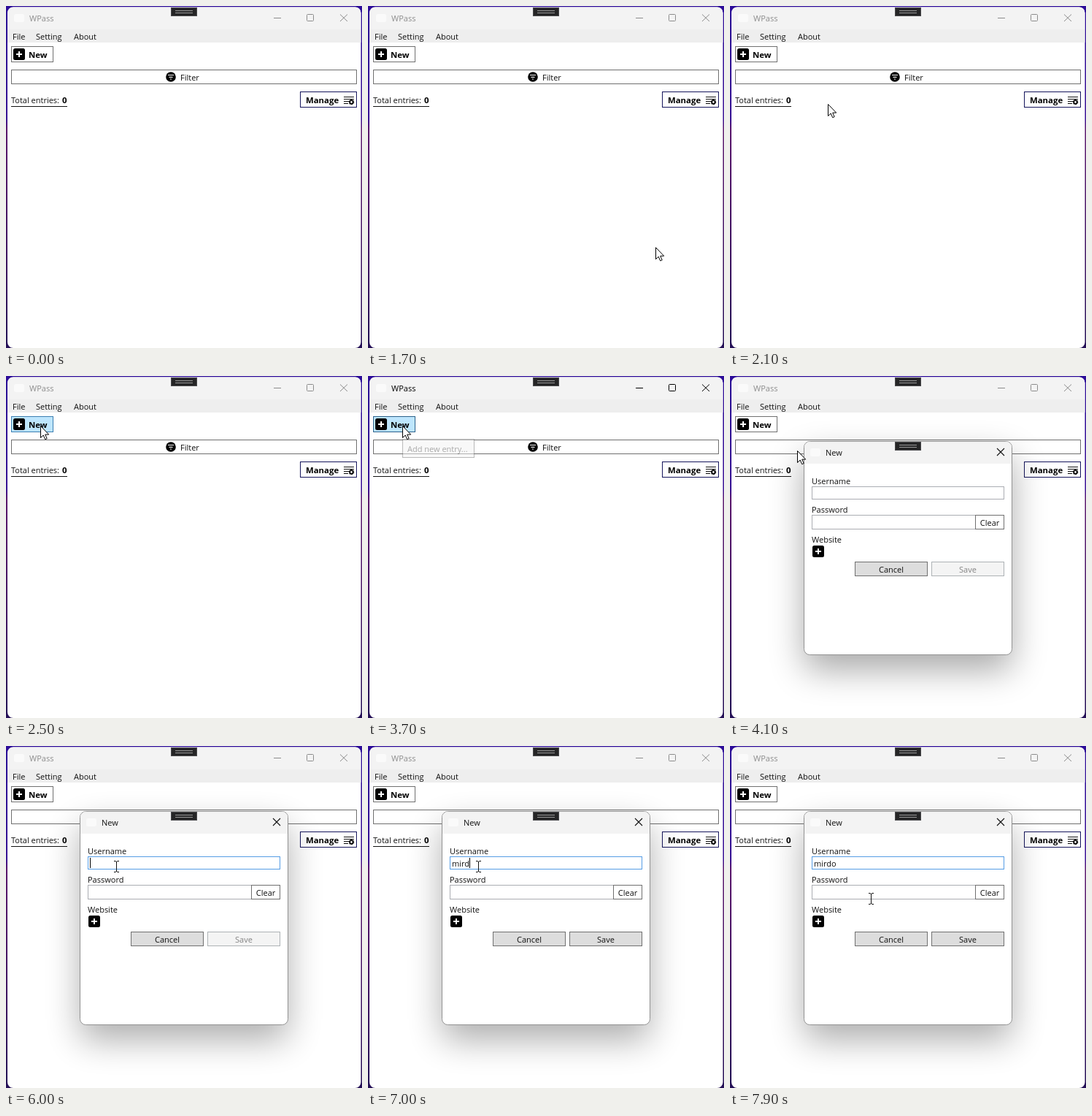
Recreate the animation shown at these times as an HTML page. Size 488x468 px, loop 8 s.

```html
<!DOCTYPE html>
<html lang="en">
<head>
<meta charset="utf-8">
<title>Password manager</title>
<style>
  html, body { margin: 0; width: 100%; height: 100%; overflow: hidden; }
  svg { display: block; width: 488px; height: 468px; }
  text { font: 11px "Open Sans", "Noto Sans", sans-serif; fill: #111; white-space: pre; }
  .bold { font-weight: 700; font-size: 11.4px; fill: #000; }
  .mid { text-anchor: middle; }
  .box { fill: #fff; stroke: #707070; }
  .field { fill: #fff; stroke: #abadb3; }
  .btn { fill: #ddd; stroke: #707070; }
  .line { fill: none; stroke: #111; }
  #chrome { --ink: #8c8c8c; }
  #chrome.active { --ink: #000; }
  #chrome text { fill: var(--ink); }
  #chrome path { fill: none; stroke: var(--ink); }
  #new.hover { fill: #bee6fd; stroke: #3c7fb1; }
  #new.pressed { stroke: #2c628b; }
  #user.hover { stroke: #7eb4ea; }
  #user.focus { stroke: #569de5; }
  #save.off rect { fill: #f4f4f4; stroke: #adb2b5; }
  #save.off text { fill: #838383; }
</style>
</head>
<body>
<svg viewBox="0 0 488 468">
  <defs>
    <linearGradient id="desk" x2="0" y2="1">
      <stop offset="0" stop-color="#2c0c98"/>
      <stop offset=".33" stop-color="#3a1296"/>
      <stop offset=".36" stop-color="#5c1a6e"/>
      <stop offset=".8" stop-color="#3a1460"/>
      <stop offset="1" stop-color="#241056"/>
    </linearGradient>
    <filter id="blur" x="-50%" y="-50%" width="200%" height="200%">
      <feGaussianBlur stdDeviation="24"/>
    </filter>
    <clipPath id="win"><rect x="2" y="1.500" width="484.500" height="466.500" rx="8"/></clipPath>
    <clipPath id="dlgClip"><rect x="102" y="90" width="284" height="291" rx="7.500"/></clipPath>
    <g id="pill">
      <rect x=".5" y=".5" width="35" height="11" fill="#252526" stroke="#4a4a4c"/>
      <path d="M6 4.500H30M6 7.500H30" stroke="#9a9a9a"/>
    </g>
    <g id="plus">
      <rect width="16" height="16" rx="2.500"/>
      <path d="M8 4V12M4 8H12" stroke="#fff" stroke-width="2"/>
    </g>
  </defs>

  <rect width="488" height="468" fill="url(#desk)"/>
  <g clip-path="url(#win)">
    <rect width="488" height="468" fill="#fff"/>
    <rect width="488" height="32" fill="#f3f3f3"/>
    <rect y="32" width="488" height="18" fill="#eee"/>
    <rect x="11" y="11" width="14" height="11" rx="2" fill="#fafafa"/>
    <g id="chrome">
      <text x="32" y="21">WPass</text>
      <path d="M367 16.500H377M413.500 11.500H420.500Q421.500 11.500 421.500 12.500V19.500Q421.500 20.500 420.500 20.500H413.500Q412.500 20.500 412.500 19.500V12.500Q412.500 11.500 413.500 11.500M458 11.500L468 21M468 11.500L458 21"/>
    </g>
    <text x="9" y="46">File</text>
    <text x="41" y="46">Setting</text>
    <text x="93" y="46">About</text>

    <rect id="new" class="box" x="7.500" y="55.500" width="57" height="21"/>
    <use href="#plus" x="10" y="58"/>
    <text class="bold" x="31" y="71">New</text>

    <rect class="box" x="7.500" y="87.500" width="473" height="19"/>
    <circle cx="226" cy="97" r="6.800"/>
    <path d="M222 94.500H230M223.500 97.300H228.500M225 100H227" stroke="#fff" stroke-width="1.200"/>
    <text x="239" y="102">Filter</text>

    <text x="7" y="133">Total entries:</text>
    <text class="bold" x="77" y="133">0</text>
    <path class="line" d="M7 137.500H84"/>

    <rect x="403.500" y="117.500" width="77" height="21" fill="#fff" stroke="#15155c"/>
    <text class="bold" x="411" y="133">Manage</text>
    <path class="line" d="M463 124.500H477M463 127.500H477M463 130.500H470M463 133.500H469"/>
    <circle cx="473.500" cy="131.500" r="2.300" fill="none" stroke="#000" stroke-width="1.800"/>
    <circle cx="473.500" cy="131.500" r="3.300" fill="none" stroke="#000" stroke-dasharray="1.700 1.756"/>

    <g id="tip">
      <rect x="47.500" y="86.500" width="98" height="25" fill="#f2f2f2" stroke="#767676"/>
      <text x="54" y="104" style="fill:#575757">Add new entry...</text>
    </g>
  </g>
  <use href="#pill" x="226" y="2"/>

  <g id="dialog">
    <g clip-path="url(#win)">
      <rect id="shadow" x="102" y="110" width="284" height="292" rx="8" filter="url(#blur)"/>
    </g>
    <rect x="101.500" y="89.500" width="285" height="292" rx="8" fill="#fff" stroke="#929292"/>
    <rect x="102" y="90" width="284" height="30" fill="#f3f3f3" clip-path="url(#dlgClip)"/>
    <rect x="110" y="99" width="14" height="11" rx="2" fill="#fafafa"/>
    <text x="131" y="109">New</text>
    <path class="line" d="M366 99L376 109M376 99L366 109" stroke-width="1.100"/>
    <use href="#pill" x="226" y="90"/>

    <text x="112" y="148">Username</text>
    <rect id="user" class="field" x="112.500" y="151.500" width="263" height="17"/>
    <text id="typed" x="115" y="165"></text>
    <path id="caret" d="M0 153V167" stroke="#000"/>

    <text x="112" y="187">Password</text>
    <rect class="field" x="112.500" y="190.500" width="224" height="19"/>
    <rect class="box" x="336.500" y="190.500" width="39" height="19"/>
    <text class="mid" x="356" y="205">Clear</text>

    <text x="112" y="228">Website</text>
    <use href="#plus" x="113" y="232"/>

    <rect class="btn" x="171.500" y="254.500" width="99" height="19"/>
    <text class="mid" x="221" y="269">Cancel</text>
    <g id="save">
      <rect class="btn" x="276.500" y="254.500" width="99" height="19"/>
      <text class="mid" x="326" y="269">Save</text>
    </g>
  </g>

  <path id="arrow" d="M.5.5V16.500L4.200 13 6.700 18.700 9.200 17.600 6.700 12.100H11.700Z" fill="#fff" stroke="#000"/>
  <path id="beam" class="line" d="M-3 -7.500H-1L.5 -6.500 2 -7.500H4M-3 7.500H-1L.5 6.500 2 7.500H4M.5 -7V7"/>
</svg>
<script>
const LOOP = 8000, STEP = 100, NAME = "mirdo";
const KEYS = [6400, 6600, 6700, 6900, 7100];
const $ = id => document.getElementById(id);

const linear = p => p;
const smooth = p => p * p * (3 - 2 * p);
const easeOut = p => 1 - (1 - p) ** 2;

// pointer strokes: start, end, from, to, easing
const STROKES = [
  [1700, 2500, [394, 330], [47, 68], easeOut],
  [3900, 4100, [47, 68], [92, 102], linear],
  [4100, 4500, [92, 102], [151, 165], easeOut],
  [7300, 7900, [151, 165], [193, 209], smooth]
];

const clamp = v => Math.min(1, Math.max(0, v));
const ramp = (t, a, b) => clamp((t - a) / (b - a));
const show = (el, on) => el.style.display = on ? "" : "none";

function pointer(t) {
  const begun = STROKES.filter(s => s[0] <= t);
  const [a, b, from, to, ease] = begun.pop() || STROKES[0];
  const p = ease(ramp(t, a, b));
  return from.map((v, i) => v + (to[i] - v) * p);
}

function draw(t) {
  const [x, y] = pointer(t);
  const inUser = t >= 4100 && y > 151 && y < 169;
  const inField = inUser || y >= 190 && t > 7300;
  const at = `translate(${Math.round(x)} ${Math.round(y)})`;
  $("arrow").setAttribute("transform", at);
  $("beam").setAttribute("transform", at);
  show($("arrow"), t >= 1700 && !inField);
  show($("beam"), inField);

  const active = t >= 3500 && t < 3900;
  $("new").classList.toggle("hover", t >= 1700 && t < 3900 && x < 65 && y < 77);
  $("new").classList.toggle("pressed", active);
  $("chrome").classList.toggle("active", active);
  $("tip").style.opacity = ramp(t, 3200, 3500) * (1 - ramp(t, 3600, 3800));

  const open = ramp(t, 3800, 4000), k = .92 + .08 * open;
  show($("dialog"), open > 0);
  $("dialog").style.opacity = open;
  $("dialog").setAttribute("transform", `translate(244 235) scale(${k}) translate(-244 -235)`);
  $("shadow").style.opacity = .34 - .02 * ramp(t, 4100, 4500);

  const count = KEYS.filter(k => k <= t).length;
  const typed = $("typed");
  typed.textContent = NAME.slice(0, count);
  $("user").classList.toggle("hover", inUser);
  $("user").classList.toggle("focus", t >= 4900);
  $("save").classList.toggle("off", count === 0);

  // the blink restarts with every key
  const since = t - (count ? KEYS[count - 1] : 4900);
  show($("caret"), since >= 0 && since % 1000 < 500);
  const cx = 115.5 + (count ? Math.round(typed.getComputedTextLength()) : 0);
  $("caret").setAttribute("transform", `translate(${cx} 0)`);
}

const start = performance.now();
function tick() {
  const t = (performance.now() - start) % LOOP;
  draw(Math.floor(t / STEP) * STEP);
  requestAnimationFrame(tick);
}
tick();
</script>
</body>
</html>
```
